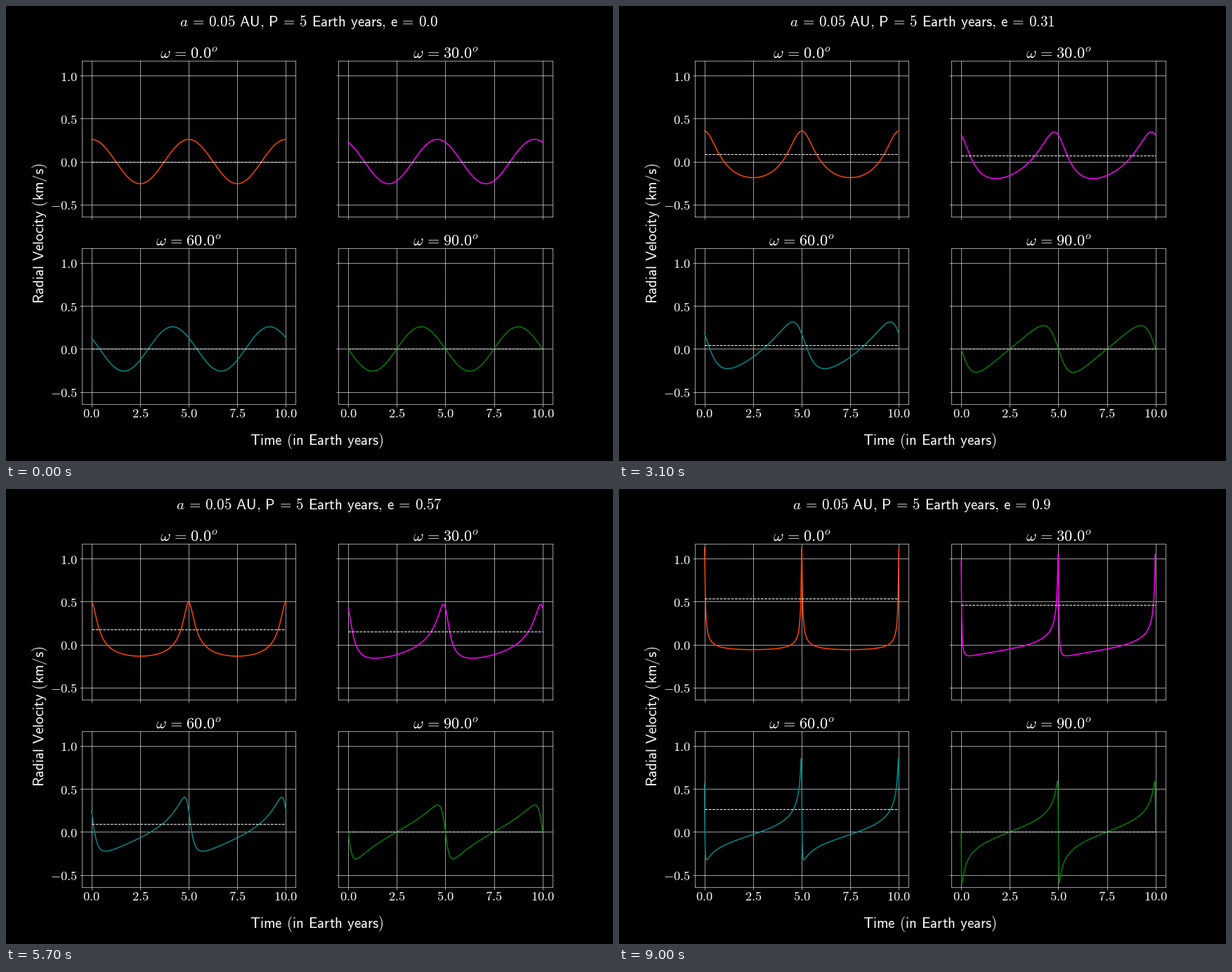
Recreate the animation shown at these times as a matplotlib script. Size 864x648 px, loop 9100 ms.

```python
import numpy as np
import matplotlib.pyplot as plt
from matplotlib.animation import FuncAnimation

W, H, DPI = 864, 648, 72
FRAMES, STEP_MS = 91, 100
PERIOD = 5
K = 2 * np.pi * 0.05 * 1.496e8 / (PERIOD * 365.25 * 86400) * np.sin(np.pi / 3)
E_MAX = 0.9
PANELS = [(0, "orangered"), (30, "magenta"), (60, "darkcyan"), (90, "green")]
THIN = 0.6

plt.style.use("dark_background")
plt.rcParams.update({
    "mathtext.fontset": "cm", "toolbar": "None",
    "axes.linewidth": THIN, "grid.linewidth": THIN,
    "xtick.major.width": THIN, "ytick.major.width": THIN,
})

t = np.linspace(0, 10, 1001)


def true_anomaly(e):
    """Solve Kepler's equation by Newton steps."""
    mean = (2 * np.pi * t / PERIOD + np.pi) % (2 * np.pi) - np.pi
    ecc = mean + 0.85 * e * np.sign(mean)
    for _ in range(12):
        ecc -= (ecc - e * np.sin(ecc) - mean) / (1 - e * np.cos(ecc))
    return 2 * np.arctan2(np.sqrt(1 + e) * np.sin(ecc / 2),
                          np.sqrt(1 - e) * np.cos(ecc / 2))


def sans(s):
    """Sans mathtext with ordinary word spaces."""
    for old, gap in ((" = ", r"\hspace{.18}=\hspace{.18}"),
                     (", ", r",\hspace{.18}"), (" ", r"\hspace{.38}")):
        s = s.replace(old, gap)
    return r"$\mathsf{" + s + "}$"


def heading(e):
    return sans(rf"\mathit{{a}} = 0.05 AU, P = 5 Earth years, e = {round(e, 2)}")


def label(x, y, s, size=21, **kw):
    kw = {"ha": "center", "va": "baseline", **kw}
    return fig.text(x / W, 1 - y / H, s, size=size, **kw)


fig, axes = plt.subplots(2, 2, sharex=True, sharey=True,
                         figsize=(W / DPI, H / DPI), dpi=DPI)
fig.subplots_adjust(left=0.1248, right=0.9, bottom=0.125, top=0.88,
                    wspace=0.2, hspace=0.2)

k_max = K / np.sqrt(1 - E_MAX ** 2)
curves, means = [], []
for ax, (omega, color) in zip(axes.flat, PANELS):
    ax.grid(True)
    ax.tick_params(labelsize=18.5)
    ax.tick_params(axis="x", pad=1)
    ax.tick_params(axis="y", pad=2.5)
    curves.append(ax.plot([], [], color=color, lw=1.5)[0])
    means.append(ax.plot([], [], "w--", lw=1)[0])
    box = ax.get_position()
    label((box.x0 + box.x1) / 2 * W, (1 - box.y1) * H - 2.5,
          rf"$\omega\hspace{{.12}}=\hspace{{.12}}{omega:.1f}^o$", 22.3)

ax.set(xlim=(-0.5, 10.5), ylim=(-k_max - 0.05, k_max * (1 + E_MAX) + 0.05),
       xticks=np.arange(0, 10.1, 2.5), yticks=np.arange(-0.5, 1.1, 0.5))
ax.xaxis.set_major_formatter(lambda v, _: f"${v:.1f}$")
ax.yaxis.set_major_formatter(lambda v, _: f"${v:.1f}$")

title = label(431.5, 29, heading(0))
label(442.8, 625, sans("Time (in Earth years)"))
label(62, 323.5, sans("Radial Velocity (km/s)"), rotation=90,
      ha="right", va="center")


def update(i):
    e = i / 100
    amp = K / np.sqrt(1 - e * e)
    nu = true_anomaly(e)
    title.set_text(heading(e))
    for curve, mean, (omega, _) in zip(curves, means, PANELS):
        w = np.radians(omega)
        offset = e * np.cos(w)
        curve.set_data(t, amp * (np.cos(nu + w) + offset))
        mean.set_data([0, 10], [amp * offset] * 2)
    return [title, *curves, *means]


anim = FuncAnimation(fig, update, frames=FRAMES, interval=STEP_MS,
                     repeat=True, repeat_delay=0)
plt.show()
```
